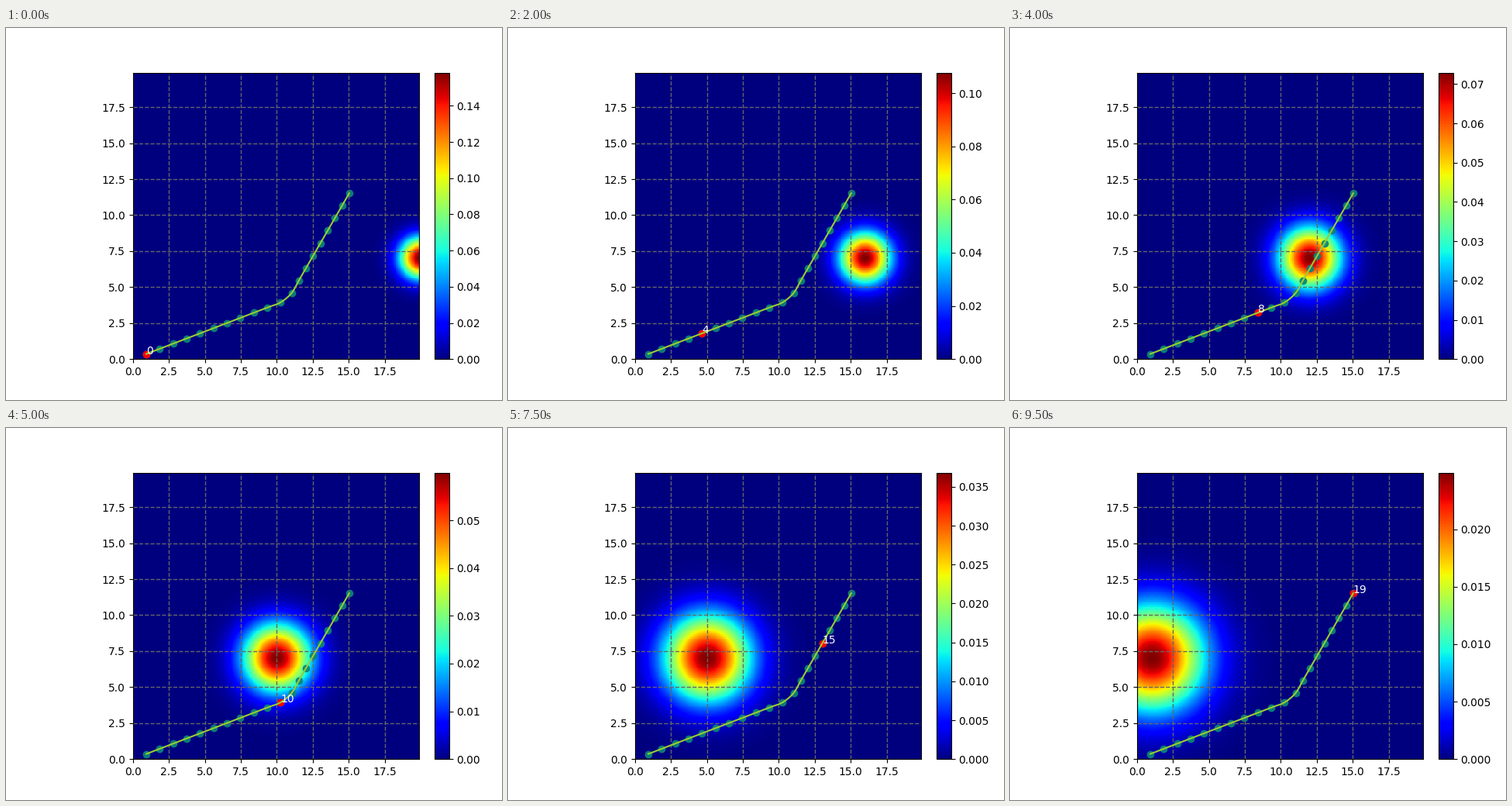
Recreate the animation shown at these times as a matplotlib script. Size 640 by 480 pixels, loop 10 s.

```python
import numpy as np
import matplotlib.pyplot as plt
from matplotlib.animation import FuncAnimation

plt.rcParams["font.family"] = "DejaVu Sans"

STEPS = 20
EXTENT = 19.9
WIDTH, HEIGHT = 640, 480
GRID = np.arange(200) * 0.1
X, Y = np.meshgrid(GRID, GRID)


def density(step):
    """Gaussian drifting left by one unit and widening 5 % per step."""
    sigma = 1.05 ** step
    dist2 = (X - (20 - step)) ** 2 + (Y - 7) ** 2
    return np.exp(-dist2 / (2 * sigma ** 2)) / (2 * np.pi * sigma ** 2)


def waypoints():
    """Unit steps at 21 degrees, one halfway turn, then 60 degrees."""
    heading = np.radians([21] * 11 + [40.5] + [60] * 8)
    return np.cumsum(np.column_stack([np.cos(heading), np.sin(heading)]), axis=0)


def smooth(points, samples=20):
    """Cubic Hermite curve through the points."""
    slope = np.gradient(points, axis=0)
    t = np.linspace(0, 1, samples)[:, None]
    parts = [
        (2 * t**3 - 3 * t**2 + 1) * points[i]
        + (t**3 - 2 * t**2 + t) * slope[i]
        + (3 * t**2 - 2 * t**3) * points[i + 1]
        + (t**3 - t**2) * slope[i + 1]
        for i in range(len(points) - 1)
    ]
    return np.vstack(parts)


def add_axes(left, width):
    return fig.add_axes([left / WIDTH, 0.11, width / WIDTH, 0.77])


fig = plt.figure(figsize=(WIDTH / 100, HEIGHT / 100), dpi=100)
ax = add_axes(163.7, 369.6)
cax = add_axes(553.2, 18.5)

image = ax.imshow(density(0), cmap="jet", origin="lower", aspect="auto",
                  interpolation="nearest", extent=(0, EXTENT, 0, EXTENT))
fig.colorbar(image, cax=cax)
ax.grid(color="#666666", linestyle="--", linewidth=1)

path = waypoints()
ax.scatter(*path.T, color="#0b8577", alpha=0.92)
current = ax.scatter(*path[0], color="red")
ax.plot(*smooth(path).T, color="yellowgreen", linewidth=1.5)
label = ax.text(*path[0], "0", color="white")
ax.set(xlim=(0, EXTENT), ylim=(0, EXTENT))


def update(step):
    field = density(step)
    image.set_data(field)
    image.set_clim(field.min(), field.max())
    current.set_offsets(path[step:step + 1])
    label.set_position(path[step])
    label.set_text(str(step))
    return image, current, label


anim = FuncAnimation(fig, update, frames=STEPS, interval=500, repeat=True)
plt.show()
```
